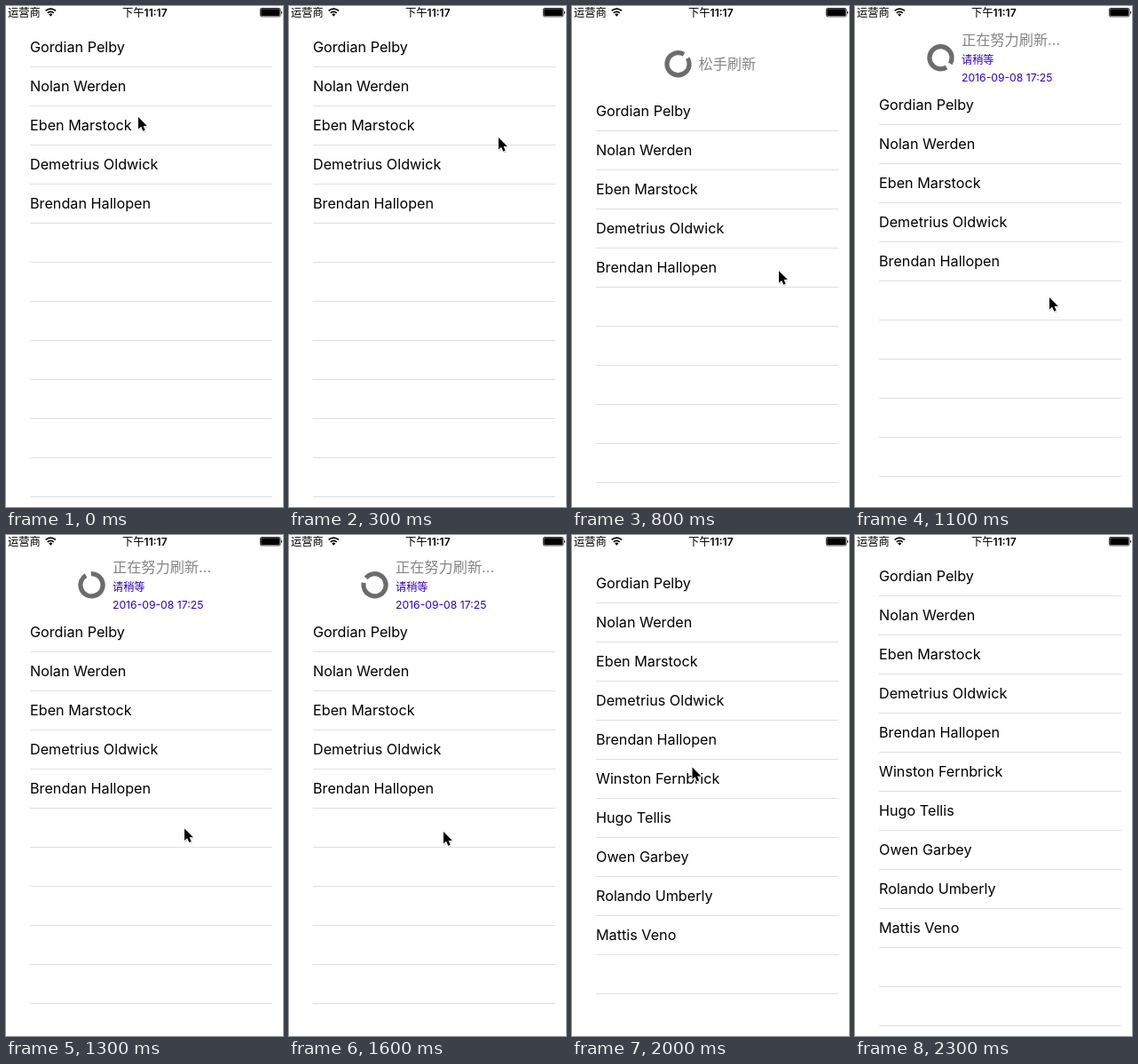
Recreate the animation shown at these times as an HTML page. Size 312 by 564 pixels, loop 2400 ms.

```html
<!DOCTYPE html>
<html lang="zh-CN">
<head>
<meta charset="utf-8">
<title>Pull to refresh</title>
<style>
  html, body { margin: 0; width: 100%; height: 100%; overflow: hidden; background: #fff; }
  svg { display: block; width: 312px; height: 564px; }
  text { font-family: Inter, "Noto Sans CJK SC", "Noto Sans CJK", sans-serif; }
  .name { font-size: 16.2px; fill: #000; }
  .status { font-size: 12.3px; fill: #000; }
  .hint { font-size: 16.2px; fill: #858585; }
  .note { font-size: 12.2px; fill: #3200b4; }
  .rule { fill: #e0e0e2; }
</style>
</head>
<body>
<svg viewBox="0 0 312 564">
  <defs>
    <clipPath id="table"><rect width="312" height="553.5"/></clipPath>
  </defs>

  <g id="header">
    <circle id="ring" r="12.6" fill="none" stroke="#6c6c6c" stroke-width="5.2"
            pathLength="360" stroke-dasharray="332 28" stroke-dashoffset="-14"/>
    <text id="pull" class="hint" x="142.5" y="6"></text>
    <g id="busy">
      <text class="hint" x="120" y="-14">正在努力刷新...</text>
      <text class="note" x="120" y="7">请稍等</text>
      <text class="note" x="120" y="27">2016-09-08 17:25</text>
    </g>
  </g>

  <g clip-path="url(#table)"><g id="list"></g></g>

  <text class="status" x="2" y="11.6">运营商</text>
  <g fill="none" stroke="#000" stroke-width="1.7">
    <path d="M44.6 5.4 Q50.3 0.8 56 5.4"/>
    <path d="M46.8 7.9 Q50.3 5 53.8 7.9"/>
  </g>
  <path d="M48.2 9.4 Q50.3 7.8 52.4 9.4 L50.3 11.8Z"/>
  <text class="status" x="131" y="12" font-weight="500">下午<tspan font-size="12" font-weight="600">11:17</tspan></text>
  <rect x="286.4" y="2.5" width="22.6" height="9.4" rx="1.6" fill="none" stroke="#000" stroke-width=".8"/>
  <rect x="287.2" y="3.3" width="21" height="7.8" rx=".8"/>
  <path d="M310 5.4 Q312 7.2 310 9Z"/>

  <g id="cursor">
    <path d="M1 1.5V15.8L4.2 12.8 6.4 17.4 9 16.4 7 11.8H11Z" fill="#000" opacity=".18"/>
    <path d="M0 0V13.6L3.1 10.8 5.3 15.7 7.7 14.7 5.6 9.9H9.9Z"
          fill="#000" stroke="#fff" stroke-width="1.8" paint-order="stroke"/>
  </g>
</svg>
<script>
const LOOP = 2400, TICK = 100, ROW = 44;
const GRAB = 500, RELEASE = 1000, BUSY = 1100, LOADED = 1700, CLOSE = 1800, LEAVE = 2300;
const REST = 63, MAX_PULL = 78;
const names = [
  'Gordian Pelby', 'Nolan Werden', 'Eben Marstock', 'Demetrius Oldwick', 'Brendan Hallopen',
  'Winston Fernbrick', 'Hugo Tellis', 'Owen Garbey', 'Rolando Umberly', 'Mattis Veno'
];

const $ = id => document.getElementById(id);
const header = $('header'), ring = $('ring'), hint = $('pull'), busy = $('busy');
const list = $('list'), cursor = $('cursor');

function add(tag, attrs, text = '') {
  const el = document.createElementNS('http://www.w3.org/2000/svg', tag);
  for (const key in attrs) el.setAttribute(key, attrs[key]);
  el.textContent = text;
  list.append(el);
  return el;
}

for (let i = 0; i < 12; i++) {
  add('rect', { class: 'rule', x: 27, y: 68 + i * ROW, width: 273, height: 1 });
}
const labels = names.map((name, i) => add('text', { class: 'name', x: 27, y: 52 + i * ROW }, name));

const clamp = u => Math.max(0, Math.min(1, u));
const mix = (a, b, u) => a.map((v, i) => v + (b[i] - v) * u);
const decay = (t, tau) => Math.exp(-t / tau);
const show = (el, on) => el.setAttribute('visibility', on ? 'visible' : 'hidden');
const move = (el, x, y, turn = 0) =>
  el.setAttribute('transform', `translate(${x} ${y}) rotate(${turn})`);

// List offset: dragged at a steady pace, settles while loading, then eases shut.
function offset(t) {
  if (t < GRAB) return 0;
  if (t <= RELEASE) return Math.min(MAX_PULL, 45 + (t - GRAB) * 0.09);
  if (t <= CLOSE) return REST + (MAX_PULL - REST) * decay(t - RELEASE, 50);
  return REST * decay(t - CLOSE, 97);
}

// The pointer moves about twice as far as the list while dragging.
function pointer(t, y) {
  if (t < GRAB) return mix([149, 125], [236, 148], clamp(t / 300));
  if (t <= RELEASE) return [233, 134 + y * 2.28];
  const drift = mix([219, 328], [174, 334], clamp((t - BUSY) / 500));
  return mix(drift, [135.5, 261.5], Math.max(0, t - CLOSE) / 200);
}

function draw(t) {
  const y = Math.round(offset(t));
  const loading = t >= BUSY && t < LOADED;

  move(list, 0, y);
  labels.forEach((el, i) => show(el, i < 5 || t >= LOADED));

  move(header, 0, y - 7);
  header.setAttribute('opacity', clamp((y - 10) / 48));
  const turn = loading ? 45 + (t - BUSY) * 1.04 : -45;
  move(ring, loading ? 96.5 : 119.5, 0.3, turn);
  hint.textContent = y > REST && t < BUSY ? '松手刷新' : '下拉刷新';
  show(hint, !loading);
  show(busy, loading);

  move(cursor, ...pointer(t, y));
  show(cursor, t < LEAVE);
}

const start = performance.now();
function frame() {
  const t = (performance.now() - start) % LOOP;
  draw(Math.floor(t / TICK) * TICK);
  requestAnimationFrame(frame);
}
frame();
</script>
</body>
</html>
```
